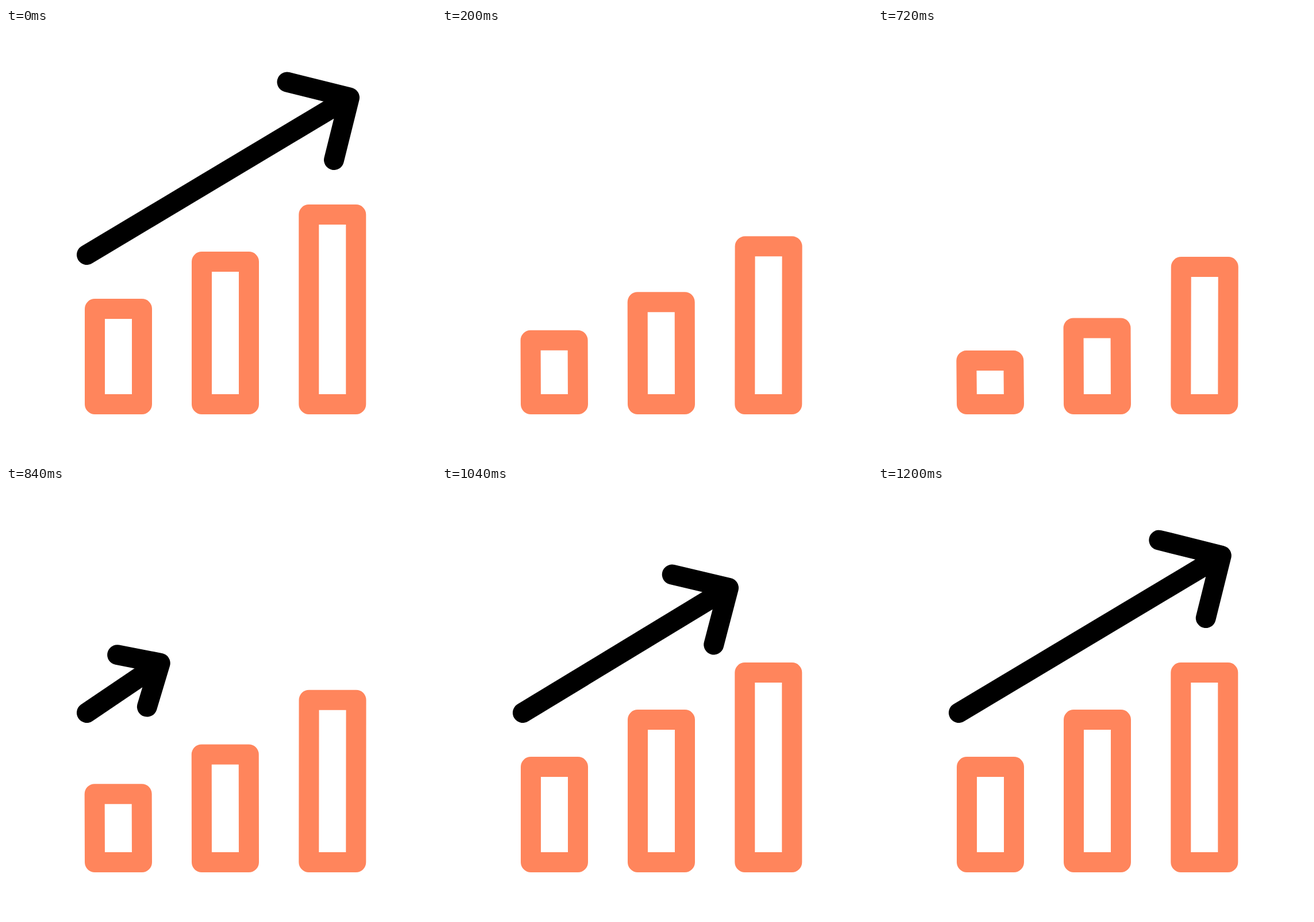
An HTML page that plays this animation: 748 by 748 pixels, repeating every 1.84 s.

```html
<!DOCTYPE html>
<html lang="en">
<head>
<meta charset="utf-8">
<title>Rising chart</title>
<style>
  html, body { margin: 0; height: 100%; overflow: hidden; background: #fff; }
  svg { display: block; width: 100%; height: 100%; }
  path { fill: none; stroke-width: 35; stroke-linecap: round; stroke-linejoin: round; }
  .bar { stroke: #ff855c; }
  #arrow { stroke: #000; }
</style>
</head>
<body>
<svg viewBox="0 0 748 748">
  <path class="bar"/><path class="bar"/><path class="bar"/>
  <path id="arrow"/>
</svg>
<script>
const LOOP = 1840, STEP = 40;
const bars = [
  { x: 154.5, top: 488.5, drop: 96, lean: -0.7 },
  { x: 340.5, top: 406.5, drop: 123, lean: -0.5 },
  { x: 526.8, top: 324.5, drop: 97, lean: 0.5 },
];
const barPaths = document.querySelectorAll('.bar');
const arrow = document.getElementById('arrow');

// Arrow points: left barb, tip, right barb
const small = [[99.3, 357.5], [163, 368], [141.5, 433.5]];
const large = [[489, 94], [597.5, 121], [570.5, 229.5]];

function ease(t, start, length) {
  const s = Math.min(1, Math.max(0, (t - start) / length));
  return s * s * (3 - 2 * s);
}

function draw(t) {
  const sunk = ease(t, 14, 340) - ease(t, 669, 338);
  bars.forEach(({ x, top, drop, lean }, i) => {
    const y = top + drop * sunk, left = x + lean * sunk;
    barPaths[i].setAttribute('d', `M${x} 654.5L${left} ${y}H${left + 82}L${x + 82} 654.5Z`);
  });

  const grown = 1 - ease(t, 14, 176) + ease(t, 667, 540);
  const [a, tip, b] = small.map((p, i) => p.map((v, k) => v + (large[i][k] - v) * grown));
  arrow.setAttribute('d', `M140.5 394.5L${tip}M${a}L${tip}L${b}`);
  arrow.style.display = grown > 0.11 ? '' : 'none';
}

function tick() {
  const t = performance.now() % LOOP;
  draw(Math.floor(t / STEP) * STEP);
  requestAnimationFrame(tick);
}
tick();
</script>
</body>
</html>
```
